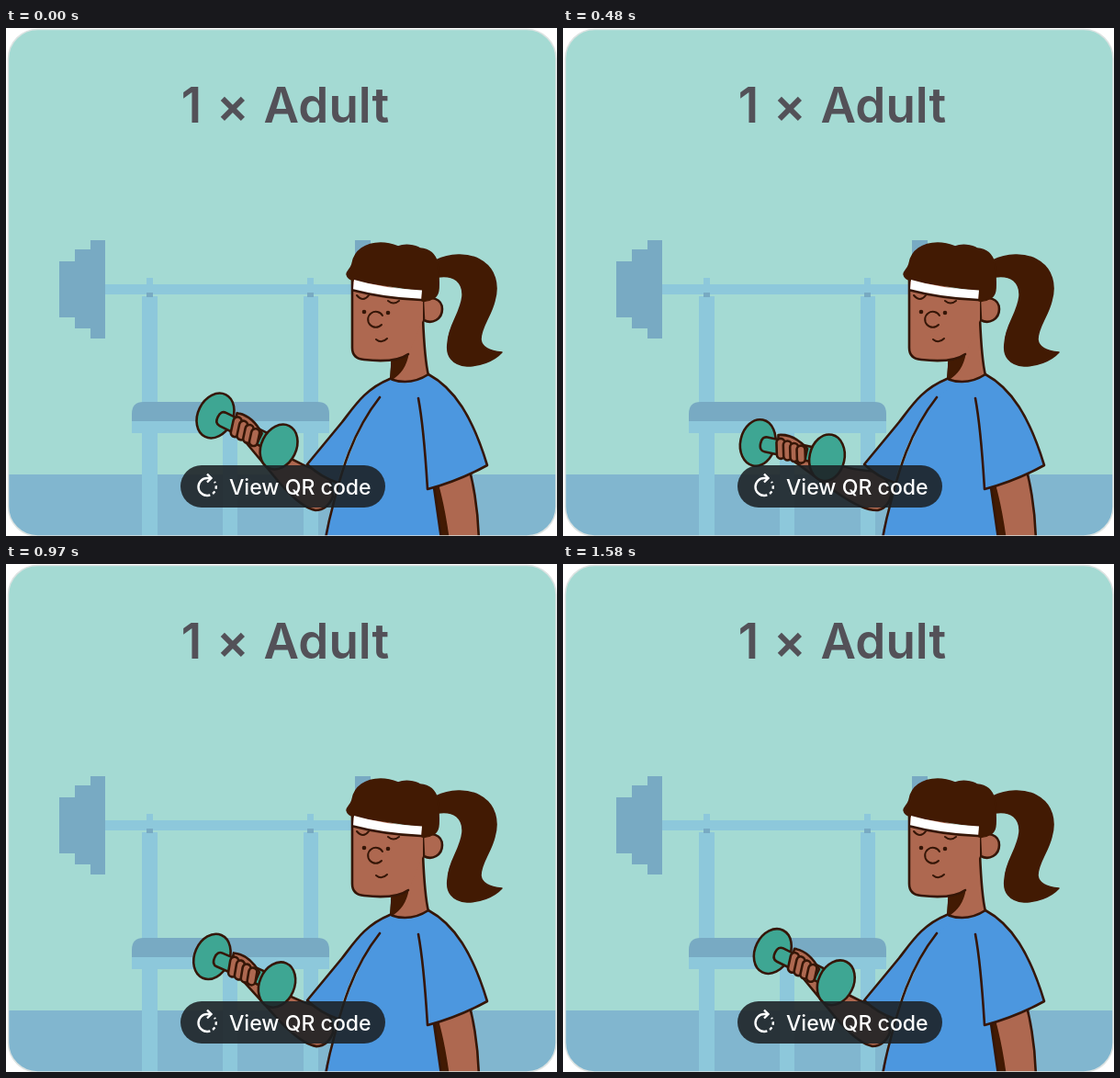
An HTML page for the animation above (1.61 s loop, 600x553 px).

```html
<!DOCTYPE html>
<html lang="en">
<head>
<meta charset="utf-8">
<title>Ticket card</title>
<style>
  html, body { margin: 0; width: 100%; height: 100%; overflow: hidden; background: #fff }
  svg { display: block; width: 100vw; height: 100vh }
  text { font-family: Inter, sans-serif; font-feature-settings: "calt" 0 }
  .line { stroke: #351607; stroke-width: 2.6; stroke-linejoin: round; stroke-linecap: round }
  .skin { fill: #ae6850 }
  .shirt { fill: #4c97df }
  .green { fill: #3ea693 }
  .hair { fill: #421a03; stroke: #421a03; stroke-width: 1.5; stroke-linejoin: round }
  .pale { fill: #8dc8db }
  .steel { fill: #78aac3 }
  .open { fill: none }
</style>
</head>
<body>
<svg viewBox="0 0 600 553">
  <defs>
    <clipPath id="card"><rect x="2.5" y="1.5" width="596.5" height="551.5" rx="32"/></clipPath>
  </defs>
  <g clip-path="url(#card)">
    <rect width="600" height="553" fill="#a4dad3"/>
    <rect y="486" width="600" height="67" fill="#81b6cf"/>

    <!-- barbell and bench -->
    <g class="pale">
      <path d="M108 279H385V290H108ZM153 272h7v20h-7ZM328 272h7v20h-7Z"/>
      <path d="M148 292h17V553h-17ZM324 292h16V553h-16ZM236 436h16V553h-16Z"/>
      <path d="M137 427H352V441H137Z"/>
    </g>
    <g class="steel">
      <path d="M58 254H75V241H92V231H108V338H92V327H75V315H58Z"/>
      <path d="M380 231h17V338h-17ZM153 288h7v5h-7ZM328 288h7v5h-7Z"/>
      <path d="M137 428V420Q137 407 150 407H339Q352 407 352 420V428Z"/>
    </g>

    <!-- head -->
    <path class="hair" d="M468 253C482 246 503 244 517 253C533 262 537 280 532 297C528 314 517 325 517 339C518 349 529 352 540 353C531 363 515 368 502 368C486 367 479 357 481 343C482 323 495 311 497 292C498 277 488 268 470 271Z"/>
    <path class="skin line" d="M421 361L419 384Q440 391 460 378C456 362 455 340 454 316L430 300Z"/>
    <path class="hair" d="M420 362Q433 361 438 354Q435 374 419 383Z"/>
    <path class="skin line" d="M454 298C462 290 475 295 475 306C475 317 464 323 455 318Z"/>
    <path class="skin" d="M377 272V348Q377 360 390 361Q424 365 438 355L454 318V290Z"/>
    <path class="line open" d="M377 275V348Q377 360 390 361Q424 365 438 355"/>
    <path class="hair" d="M371 268C371 265 375 263 377 257C379 242 392 234 408 234C416 234 422 236 427 238C434 235 445 236 451 240C464 241 471 250 471 267C471 280 473 289 466 294Q460 298 453 297V286L379 275Q372 273 371 268Z"/>
    <path d="M379 274Q413 284 453 285.500L452 296Q412 294 378 285Z" fill="#fff"/>
    <path class="line open" d="M378 285.500Q412 294.500 452 296"/>
    <g class="open" stroke="#351607" stroke-width="2" stroke-linecap="round">
      <path d="M382 291Q389 299 395 291M416 297Q422 302 428 297"/>
      <path d="M410 313A8.500 8.500 0 1 0 409 323M403 339Q409 344 415 338"/>
    </g>
    <g fill="#351607"><circle cx="390" cy="309" r="2.3"/><circle cx="416" cy="310" r="2.3"/></g>

    <!-- body -->
    <path class="skin line" d="M466 498L482 560H515Q514 515 504 478Z"/>
    <path class="hair" d="M466 496L474 556H482Q477 520 470 496Z"/>
    <path class="shirt" d="M418 382Q440 390 460 377C488 392 508 423 524 476Q493 493 459 502L466 500L474 556H346C355 520 375 445 407 402Z"/>
    <path class="line open" d="M418 382Q440 390 460 377C488 392 508 423 524 476Q493 493 459 502C457 470 455 435 449 403M466 500L474 556"/>

    <!-- forearm with dumbbell -->
    <g id="arm">
      <path class="skin line" d="M268 440L300 462Q322 478 352 485L356 510Q350 525 337 525Q321 522 297 494L262 452Z"/>
      <g transform="translate(228 422) rotate(26.2)">
        <ellipse class="green line" rx="19" ry="25.500"/>
        <path class="green line" d="M80 -8H9Q3 -8 3 0Q3 8 9 8H80Z"/>
        <path class="skin line" d="M20 -13Q36 -18 54 -5V7H24Z"/>
        <g id="fingers" class="skin line"></g>
        <ellipse class="green line" cx="77" rx="19" ry="25.500"/>
      </g>
    </g>

    <!-- near sleeve -->
    <path class="shirt" d="M418 382C391 393 380 411 366 429L328 475Q343 489 361 495C370 462 384 429 407 402L425 390Z"/>
    <path class="line open" d="M418 382C391 393 380 411 366 429L328 475Q343 489 361 495M407 402C377 440 365 484 356 520Q351 538 348 556"/>
  </g>
  <rect x="2.500" y="1.500" width="596.5" height="551.5" rx="32" fill="none" stroke="#dce3e2" stroke-width="1.5"/>

  <text x="304" y="103" text-anchor="middle" font-size="53" font-weight="600" word-spacing="2.5" fill="#535158">1 × Adult</text>

  <!-- button -->
  <rect x="190" y="476" width="223" height="46" rx="23" fill="#1c2024" fill-opacity=".88"/>
  <g fill="none" stroke="#fff" stroke-width="2.4">
    <path d="M222 490H219A9.500 9.500 0 0 0 219 509"/>
    <path d="M219 509A9.500 9.500 0 0 0 227 494" stroke-dasharray="3.400 3"/>
    <path d="M219 485.500L223.500 490L219 494.500"/>
  </g>
  <text x="243" y="507.500" font-size="23.1" font-weight="500" fill="#fff">View QR code</text>
</svg>
<script>
  const LOOP = 1610;
  // [time in ms, elbow angle in degrees], eased between stops
  const STOPS = [[0, 0], [570, -15], [1325, 7.5], [LOOP, 0]];
  const arm = document.getElementById('arm');

  document.getElementById('fingers').innerHTML = [25.5, 33, 40.5, 48]
    .map((x, i) => `<rect x="${x - 4.5}" y="${-10 + i}" width="9" height="${22 - i}" rx="4.500" transform="rotate(-14 ${x} 0)"/>`)
    .join('');

  function angleAt(time) {
    const next = STOPS.findIndex(stop => stop[0] > time);
    const [t0, a0] = STOPS[next - 1], [t1, a1] = STOPS[next];
    const u = (time - t0) / (t1 - t0);
    return a0 + (a1 - a0) * u * u * (3 - 2 * u);
  }

  function draw() {
    arm.setAttribute('transform', `rotate(${angleAt(performance.now() % LOOP)} 340 501)`);
    requestAnimationFrame(draw);
  }
  draw();
</script>
</body>
</html>
```
